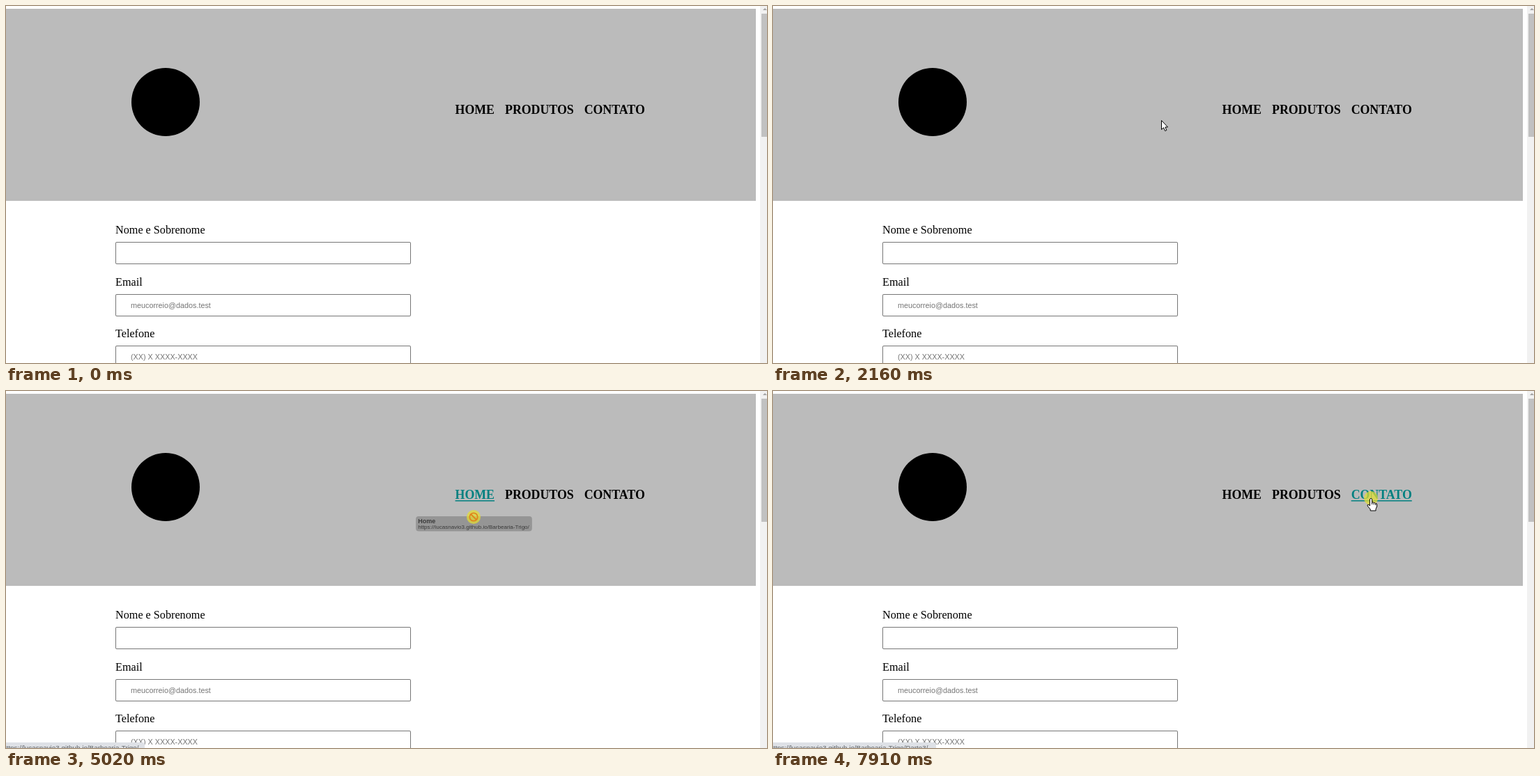
These frames come from a looping animation (1092x513 px, 8 s). An HTML page with a canvas:

```html
<!DOCTYPE html>
<html lang="pt-BR">
<head>
<meta charset="utf-8">
<title>Contato</title>
<style>
html, body { margin: 0; width: 100%; height: 100%; overflow: hidden; background: #fff; }
canvas { display: block; }
</style>
</head>
<body>
<canvas id="stage" width="1092" height="513"></canvas>
<script>
const ctx = document.getElementById('stage').getContext('2d');
const LOOP = 8000, STEP = 70;
const SERIF = '"Liberation Serif", serif';
const SANS = '"Liberation Sans", sans-serif';
const NAV_FONT = `bold 17.82px ${SERIF}`;
const SITE = 'https://lucasnavio3.github.io/Barbearia-Trigo/';

// The pointer sets out at `leave`, rests on `spot` from `arrive`, then presses and drags.
const links = [
  { title: 'Home', page: '', spot: { x: 671, y: 152 }, leave: 2930, arrive: 3270, press: 3800, drag: 4880, drop: 29 },
  { title: 'Produtos', page: 'Parte2/', spot: { x: 746, y: 143 }, leave: 5290, arrive: 5630, press: 6030, drag: 6630, drop: 17 },
  { title: 'Contato', page: 'Parte3/', spot: { x: 858, y: 154 }, leave: 7230, arrive: 7630, press: 7910, drag: LOOP, drop: 0 }
];

ctx.font = NAV_FONT;
let navX = 644.6;
links.forEach((link, i) => {
  link.text = link.title.toUpperCase();
  link.url = SITE + link.page;
  link.x = navX;
  link.width = ctx.measureText(link.text).width;
  link.on = (link.leave + link.arrive) / 2;
  link.off = i + 1 < links.length ? links[i + 1].leave : LOOP;
  navX += link.width + 15;
});

// Free roaming: a smooth curve through evenly timed points.
const roam = {
  start: 410, gap: 249,
  points: '1068,490 800,250 558,88 468,108 437,200 560,262 642,200 556,164 680,224 672,138'
    .split(' ').map(s => { const [x, y] = s.split(',').map(Number); return { x, y }; })
};

const clamp = v => Math.min(1, Math.max(0, v));
const ease = u => u * u * (3 - 2 * u);
const held = (time, start) => Math.floor((time - start + 12) / STEP) * STEP;

function blend(p, q, u) {
  return { x: Math.round(p.x + (q.x - p.x) * u), y: Math.round(p.y + (q.y - p.y) * u) };
}

function roamAt(time) {
  const { start, gap, points } = roam, last = points.length - 1;
  const s = Math.min(held(time, start) / gap, last);
  const i = Math.min(Math.floor(s), last - 1), u = s - i;
  const [a, b, c, d] = [-1, 0, 1, 2].map(k => points[Math.min(last, Math.max(0, i + k))]);
  const curve = k => Math.round(b[k] + u / 2 * (c[k] - a[k] +
    u * (2 * a[k] - 5 * b[k] + 4 * c[k] - d[k] + u * (3 * (b[k] - c[k]) + d[k] - a[k]))));
  return { x: curve('x'), y: curve('y') };
}

function pointerAt(time) {
  const i = links.findLastIndex(l => time >= l.leave);
  if (i < 0) return roamAt(time);
  const link = links[i];
  const from = i ? pointerAt(link.leave - 1) : roamAt(link.leave);
  const u = clamp((held(time, link.leave) + STEP) / (link.arrive - link.leave));
  const p = blend(from, link.spot, ease(u));
  if (time >= link.drag) {
    p.y += Math.round(link.drop * clamp((held(time, link.drag) + STEP) / (2 * STEP)));
  }
  return p;
}

function rect(x, y, w, h, color) {
  ctx.fillStyle = color;
  ctx.fillRect(x, y, w, h);
}

function text(str, x, y, font, color) {
  ctx.font = font;
  ctx.fillStyle = color;
  ctx.fillText(str, x, y);
}

function disc(x, y, r, color) {
  ctx.fillStyle = color;
  ctx.beginPath();
  ctx.arc(x, y, r, 0, Math.PI * 2);
  ctx.fill();
}

function roundBox(x, y, w, h, r, color) {
  ctx.beginPath();
  ctx.roundRect(x, y, w, h, r);
  ctx.fillStyle = color;
  ctx.fill();
}

function drawField(label, hint, y) {
  text(label, 157, y - 12, `16.2px ${SERIF}`, '#000');
  roundBox(157, y, 424, 32, 2, '#767676');
  roundBox(158, y + 1, 422, 30, 1, '#fff');
  text(hint, 179, y + 20, `10.8px ${SANS}`, '#757575');
}

function drawPage(active) {
  rect(0, 0, 1092, 513, '#fff');
  rect(0, 4, 1076, 276, '#bbb');
  disc(229, 138, 49, '#000');
  for (const link of links) {
    const color = link === active ? '#008080' : '#000';
    text(link.text, link.x, 155, NAV_FONT, color);
    if (link === active) rect(link.x, 157, link.width, 1.5, color);
  }
  const hints = { 'Nome e Sobrenome': '', Email: 'meucorreio@dados.test', Telefone: '(XX) X XXXX-XXXX' };
  Object.entries(hints).forEach(([label, hint], i) => drawField(label, hint, Math.round(339 + i * 74.5)));

  rect(1082, 0, 10, 513, '#f1f1f1');
  rect(1084, 11, 8, 177, '#c1c1c1');
  ctx.fillStyle = '#a3a3a3';
  ctx.fill(new Path2D('M1086 6 L1089 3 L1092 6 Z'));
}

function drawStatus(link) {
  roundBox(-4, 505, link.page ? 238 : 203, 14, [0, 3, 0, 0], '#dee1e6');
  text(link.url, -5, 516, `9.9px ${SANS}`, '#5f6368');
}

function drawDragLabel(link, p) {
  const font = `8.07px ${SANS}`;
  ctx.font = font;
  const w = ctx.measureText(link.url).width + 7, x = p.x + 0.5 - w / 2;
  roundBox(x, p.y - 1, w, 21.5, 4, '#959595');
  text(link.title, x + 3, p.y + 9, `bold 9px ${SANS}`, '#3a3a3a');
  text(link.url, x + 3, p.y + 17, font, '#3a3a3a');
}

const arrow = new Path2D('M.5 .5 V13.5 L3.5 10.8 L5.6 15.5 L7.8 14.5 L5.8 10 H9.5 Z');
const hand = new Path2D('M-1.6 1.5 Q0 -1 1.6 1.5 V6 Q3.2 5.2 4.2 6.6 Q5.8 6 6.7 7.6 ' +
  'Q8.6 7.2 8.6 9.2 V12 L7 15.5 V18 H-.8 V16 L-5 11 Q-5.2 8.6 -3 9.4 L-1.6 11 Z');
const knuckles = new Path2D('M1.6 6 V9 M4.2 6.8 V9.4 M6.7 7.8 V10');

function drawPointer(shape, p) {
  ctx.save();
  ctx.translate(p.x, p.y);
  ctx.fillStyle = '#fff';
  ctx.strokeStyle = '#000';
  ctx.lineWidth = 1;
  ctx.lineJoin = 'round';
  ctx.fill(shape);
  ctx.stroke(shape);
  if (shape === hand) ctx.stroke(knuckles);
  ctx.restore();
}

function drawNoDrop(p) {
  ctx.strokeStyle = '#e0861c';
  ctx.lineWidth = 1.8;
  ctx.beginPath();
  ctx.arc(p.x, p.y, 5.7, 0, Math.PI * 2);
  ctx.moveTo(p.x - 4, p.y - 4);
  ctx.lineTo(p.x + 4, p.y + 4);
  ctx.stroke();
}

function draw(time) {
  const active = links.find(l => time >= l.on && time < l.off);
  const latest = links.findLast(l => time >= l.on);
  const dragging = active && time >= active.drag;

  drawPage(active);
  if (latest) drawStatus(latest);
  if (time < roam.start) return;

  const p = pointerAt(time);
  if (dragging) drawDragLabel(active, p);
  if (active && time >= active.press) disc(p.x, p.y, 10, 'rgba(228,222,50,.72)');
  if (dragging) drawNoDrop(p);
  else drawPointer(active ? hand : arrow, p);
}

const begin = performance.now();
function frame() {
  draw((performance.now() - begin) % LOOP);
  requestAnimationFrame(frame);
}
frame();
</script>
</body>
</html>
```
